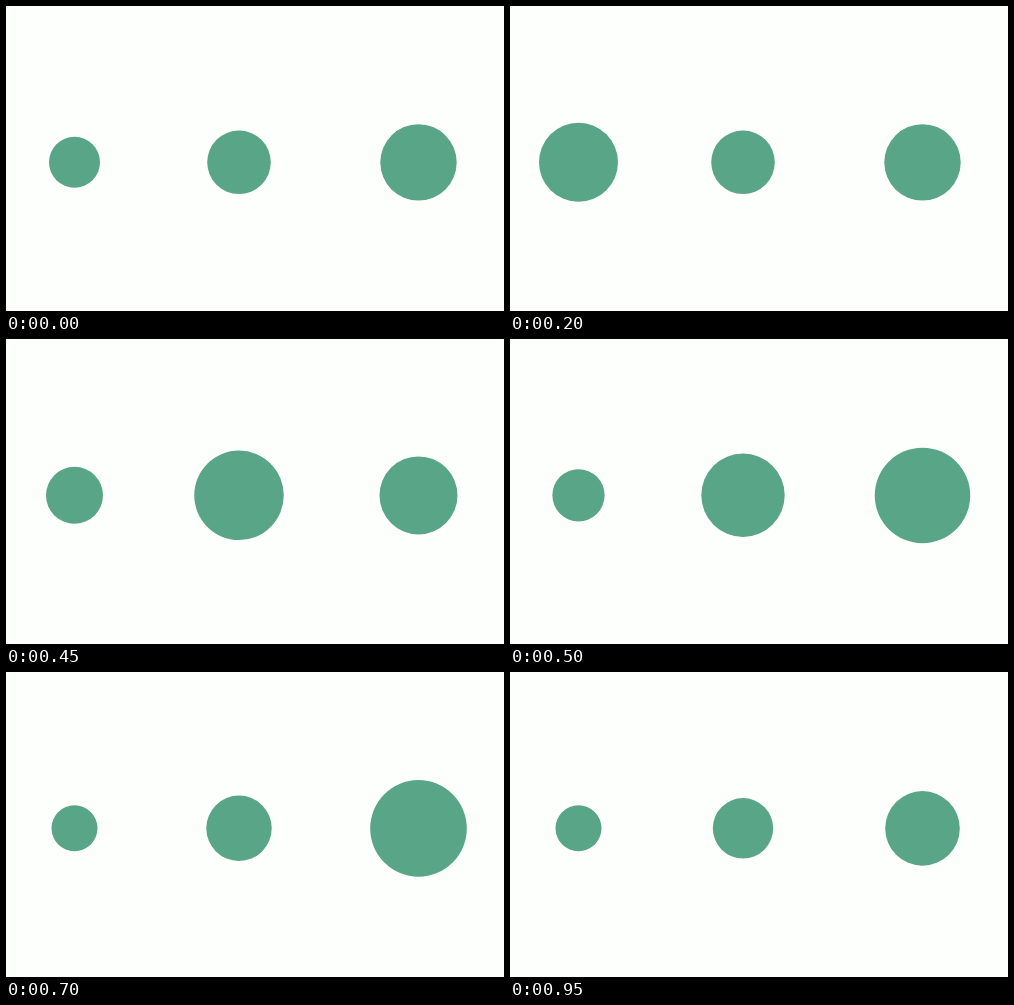
Recreate the animation shown at these times as an HTML page. Size 498 by 305 pixels, loop 1 s.

```html
<!DOCTYPE html>
<html lang="en">
<head>
<meta charset="utf-8">
<title>Pulsing dots</title>
<style>
  html, body {
    margin: 0;
    width: 100%;
    height: 100%;
    overflow: hidden;
    background: #fdfffc;
  }
  svg { display: block; width: 100vw; height: 100vh; }
  circle {
    fill: #59a587;
    animation: 1s step-end infinite;
  }
  .small  { r: 23px; animation-name: small; }
  .medium { r: 30px; animation-name: medium; }
  .large  { r: 37.3px; animation-name: large; }

  /* The picture advances every 50 ms, so each span has one step per 5%. */
  @keyframes small {
    0%   { r: 25.5px; animation-timing-function: steps(3, end); }
    15%  { r: 41.5px; animation-timing-function: steps(3, end); }
    30%  { r: 35.5px; animation-timing-function: steps(5, end); }
    55%  { r: 23.8px; }
    60%  { r: 23px; }
    100% { r: 23px; }
  }
  @keyframes medium {
    0%   { r: 31.8px; }
    20%  { r: 31.8px; animation-timing-function: steps(4, end); }
    40%  { r: 47.8px; animation-timing-function: steps(4, end); }
    60%  { r: 35.6px; animation-timing-function: steps(2, end); }
    70%  { r: 32.7px; animation-timing-function: steps(5, end); }
    95%  { r: 30.2px; }
    100% { r: 30.2px; }
  }
  @keyframes large {
    0%   { r: 38.2px; }
    45%  { r: 39px; animation-timing-function: steps(2, end); }
    55%  { r: 56.5px; }
    60%  { r: 51.6px; animation-timing-function: steps(2, end); }
    70%  { r: 48.3px; animation-timing-function: steps(5, end); }
    95%  { r: 37.3px; }
    100% { r: 37.3px; }
  }
</style>
</head>
<body>
<svg viewBox="0 0 498 305">
  <circle class="small" cx="68.5" cy="156.3"/>
  <circle class="medium" cx="233" cy="156.3"/>
  <circle class="large" cx="412.5" cy="156.4"/>
</svg>
</body>
</html>
```
